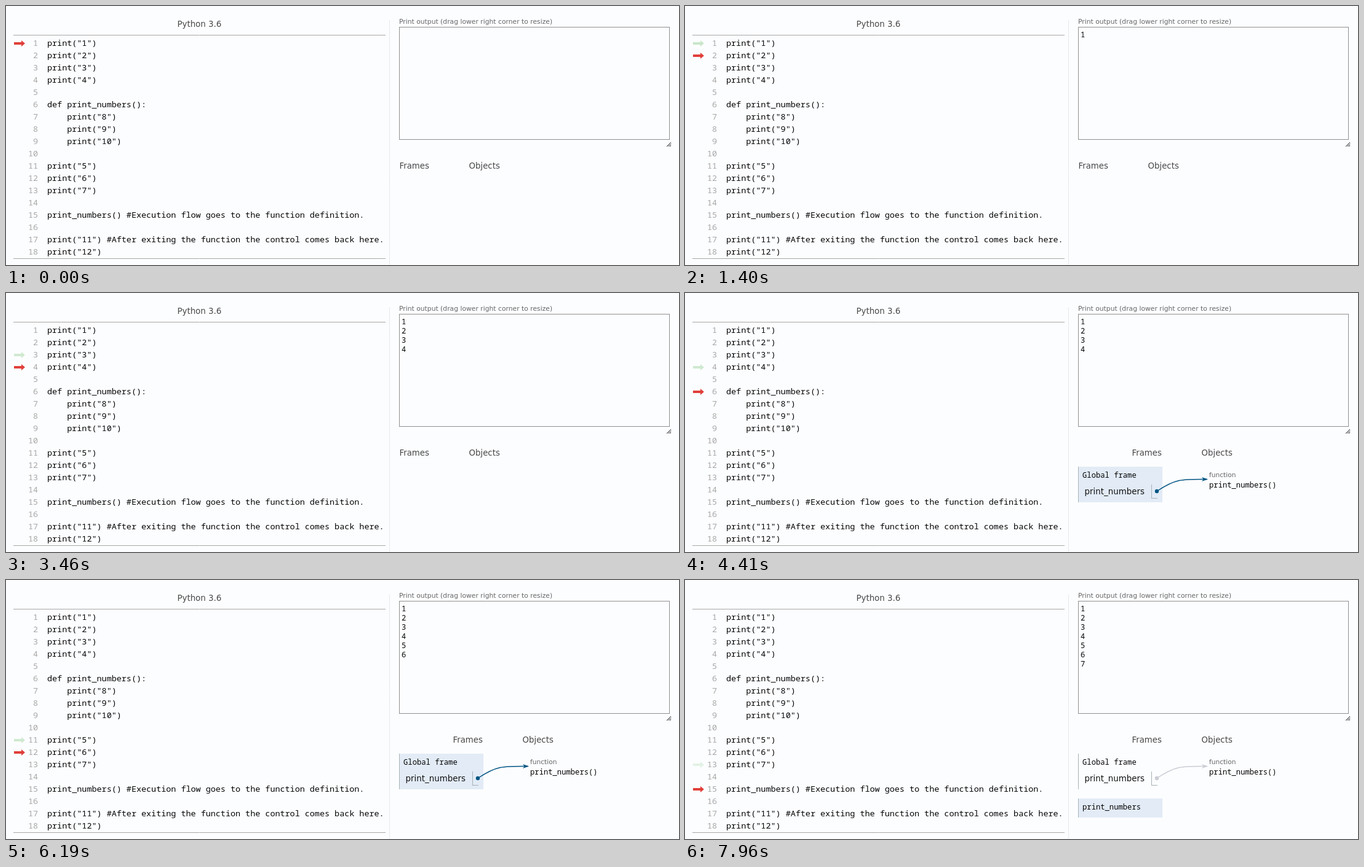
Write an HTML page with a canvas that moves like this. It is 1094 by 422 pixels and loops after 8000 ms.

```html
<!DOCTYPE html>
<html lang="en">
<head>
<meta charset="utf-8">
<title>Code stepping</title>
<style>
html, body { margin: 0; width: 100%; height: 100%; overflow: hidden; background: #fcfdff; }
canvas { display: block; width: 1094px; height: 422px; }
</style>
</head>
<body>
<canvas id="stage" width="1094" height="422"></canvas>
<script>
const ctx = document.getElementById('stage').getContext('2d');
const LOOP = 8000, TICK = 41, LEAD = 60;
const MONO = '"Noto Sans Mono", monospace';
const SANS = '"DejaVu Sans", sans-serif';
const BG = '#fcfdff', RED = '#e0403a', PALE = '#c9e6ca', ACTIVE = '#e2ebf6';
const INK = '#050505', HEAD = '#484848', LABEL = '#666', EDGE = '#a6b3b6';

const code = [
  'print("1")', 'print("2")', 'print("3")', 'print("4")', '',
  'def print_numbers():', '    print("8")', '    print("9")', '    print("10")', '',
  'print("5")', 'print("6")', 'print("7")', '',
  'print_numbers() #Execution flow goes to the function definition.', '',
  'print("11") #After exiting the function the control comes back here.',
  'print("12")'
];

// Click times, and the line the red arrow rests on between them
const clicks = [820, 1650, 2640, 3460, 4410, 5280, 6190, 7010, 7880];
const stops = [1, 2, 3, 4, 6, 11, 12, 13, 15, 6];

const clamp = v => Math.min(1, Math.max(0, v));
const ease = p => p < 0.5 ? 4 * p ** 3 : 1 - 4 * (1 - p) ** 3;

function text(str, x, y, size, color, family = MONO, align = 'left') {
  ctx.font = `${size}px ${family}`;
  ctx.fillStyle = color;
  ctx.textAlign = align;
  ctx.fillText(str, x, y);
}

function rect(x, y, w, h, color) {
  ctx.fillStyle = color;
  ctx.fillRect(x, y, w, h);
}

function poly(points, color) {
  ctx.beginPath();
  points.forEach(([x, y]) => ctx.lineTo(x, y));
  ctx.closePath();
  ctx.fillStyle = color;
  ctx.fill();
}

function line(x1, y1, x2, y2, color, dash = []) {
  ctx.beginPath();
  ctx.setLineDash(dash);
  ctx.moveTo(x1, y1);
  ctx.lineTo(x2, y2);
  ctx.strokeStyle = color;
  ctx.lineWidth = 1;
  ctx.stroke();
  ctx.setLineDash([]);
}

function gutterArrow(row, color, alpha = 1) {
  ctx.save();
  ctx.globalAlpha = alpha;
  ctx.translate(13, 36 + row * 20);
  poly([[0, 3], [12, 3], [12, 0], [18, 5], [12, 10], [12, 7], [0, 7]], color);
  ctx.restore();
}

function drawCode() {
  text('Python 3.6', 278.5, 34, 13.33, HEAD, SANS);
  line(12, 47.5, 617, 47.5, '#a8a8a8');
  line(12, 411.5, 617, 411.5, '#a8a8a8');
  code.forEach((src, i) => {
    const y = 65 + i * 20;
    text(i + 1, 52, y, 13.43, '#a8a8a8', MONO, 'right');
    text(src, 67, y, 13.43, INK);
  });
}

function drawOutput(count) {
  line(623.5, 24, 623.5, 422, '#d4d4d8', [1, 1]);
  text('Print output (drag lower right corner to resize)', 639, 29, 10.77, LABEL, SANS);
  ctx.strokeStyle = '#909090';
  ctx.lineWidth = 1;
  ctx.strokeRect(639.5, 34.5, 439, 183);
  for (let i = 0; i < count; i++) text(i + 1, 643, 51 + i * 15, 12.2, INK);
  for (let i = 0; i < 3; i++) line(1074 + i * 2.5, 229, 1081, 222 + i * 2.5, '#222');
}

function connector(color) {
  ctx.strokeStyle = color;
  ctx.lineWidth = 1.5;
  ctx.beginPath();
  ctx.moveTo(767, 323);
  ctx.bezierCurveTo(797, 303, 807, 303, 849, 303.5);
  ctx.stroke();
  ctx.beginPath();
  ctx.arc(767, 323, 3.2, 0, Math.PI * 2);
  ctx.fillStyle = color;
  ctx.fill();
  poly([[850, 303.5], [840, 300], [843, 303.5], [840, 307]], color);
}

function drawMemory(defined, called) {
  const shift = defined ? 87 : 0;
  text('Frames', 639.5 + shift, 265, 13.33, HEAD, SANS);
  text('Objects', 752.5 + shift, 265, 13.33, HEAD, SANS);
  if (!defined) return;

  rect(639, 283, 137, 58, called ? BG : ACTIVE);
  rect(639, 283, 1, 58, EDGE);
  text('Global frame', 646, 301, 12.2, INK);
  text('print_numbers', 649.5, 328, 13.4, '#111', SANS);
  rect(758, 312, 1, 23, EDGE);
  rect(758, 334, 10, 1, EDGE);
  text('function', 852, 300, 10.67, LABEL, SANS);
  text('print_numbers()', 852, 317, 12.2, INK);
  connector(called ? '#ccccd4' : '#005583');

  if (called) {
    rect(639, 356, 137, 31, ACTIVE);
    rect(639, 356, 1, 31, EDGE);
    text('print_numbers', 646, 374, 12.2, INK);
  }
}

// The old pale arrow fades, the red one slides, then the pale one marks the line left behind
function drawArrows(t, done) {
  if (!done) return gutterArrow(stops[0], RED);
  const i = done - 1;
  const local = Math.floor((t - clicks[i]) / TICK) * TICK + LEAD;
  const move = ease(clamp((local - 200) / 250));
  if (move === 1) gutterArrow(stops[i], PALE);
  else if (i > 0) gutterArrow(stops[i - 1], PALE, 1 - ease(clamp(local / 200)));
  gutterArrow(stops[i] + (stops[i + 1] - stops[i]) * move, RED);
}

function draw(now) {
  const t = now % LOOP;
  const done = clicks.filter(c => c <= t).length;
  rect(0, 0, 1094, 422, BG);
  drawCode();
  drawOutput(Math.min(7, done > 4 ? done - 1 : done));
  drawMemory(done > 4, done > 8);
  drawArrows(t, done);
}

const start = performance.now();
function loop() {
  draw(performance.now() - start);
  requestAnimationFrame(loop);
}
loop();
</script>
</body>
</html>
```
